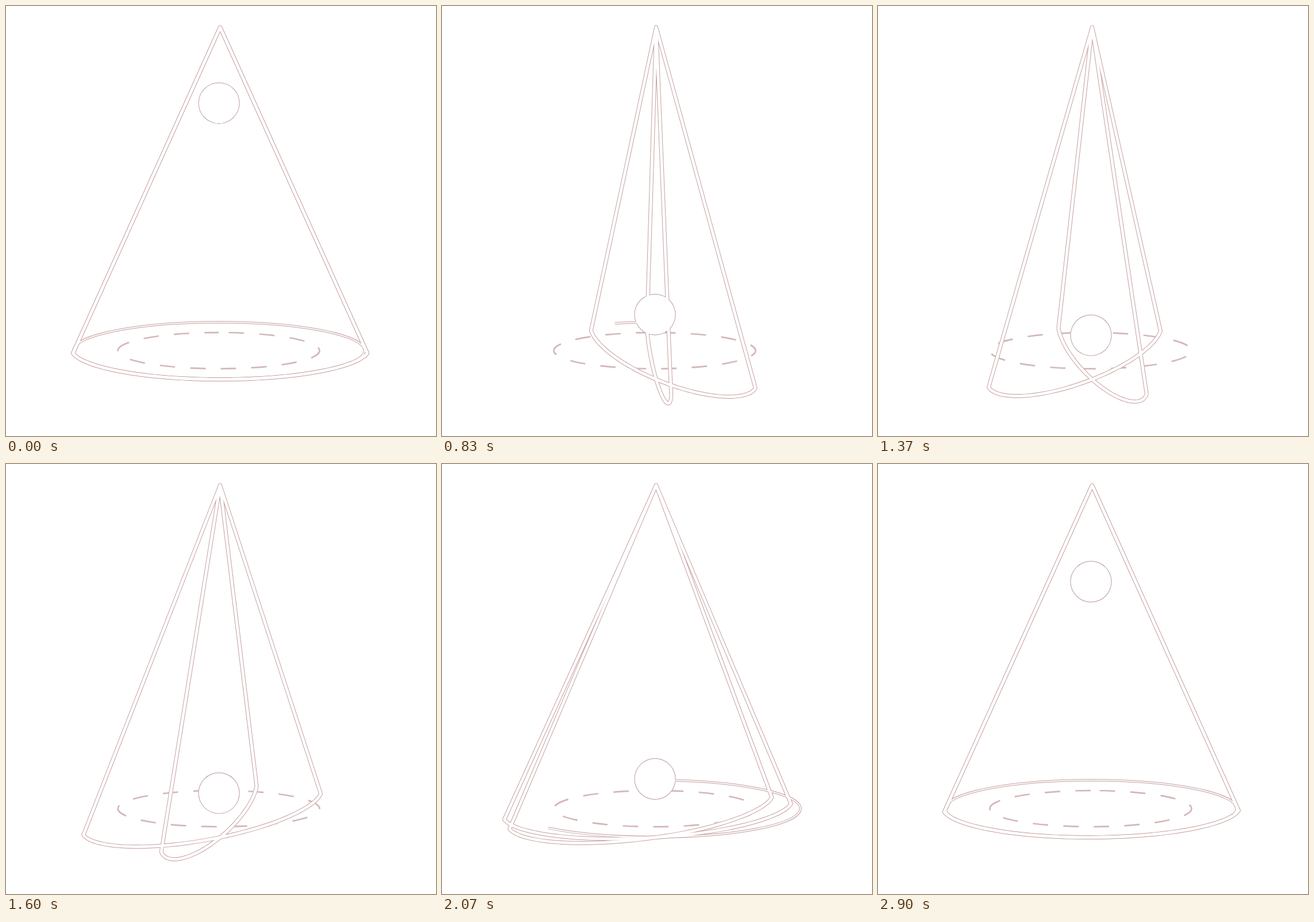
Animation, 748 px wide and 748 px high, one loop 2.93 s. Source, as an HTML page with a canvas:

```html
<!DOCTYPE html>
<html lang="en">
<head>
<meta charset="utf-8">
<title>Spinning cone and ball</title>
<style>
  html, body { margin: 0; width: 100%; height: 100%; overflow: hidden; background: #fff; }
  canvas { display: block; width: 748px; height: 748px; }
</style>
</head>
<body>
<canvas id="stage" width="748" height="748"></canvas>
<script>
const ctx = document.getElementById('stage').getContext('2d');
const LOOP = 2930, STEPS = 88, TURN = 1465;
const TAU = Math.PI * 2;
const EDGE = '#c39c9c', BALL_EDGE = '#b8989e';

const clamp = v => Math.min(1, Math.max(0, v));
const cubic = (a, b, c, d, s) => {
  const r = 1 - s;
  return r * r * r * a + 3 * r * r * s * b + 3 * r * s * s * c + s * s * s * d;
};

function bezier(x1, y1, x2, y2) {
  return x => {
    if (x <= 0 || x >= 1) return clamp(x);
    let lo = 0, hi = 1;
    for (let i = 0; i < 24; i++) {
      const mid = (lo + hi) / 2;
      if (cubic(0, x1, x2, 1, mid) < x) lo = mid; else hi = mid;
    }
    return cubic(0, y1, y2, 1, lo);
  };
}

const fall = bezier(.167, .55, .35, 1);
const rise = bezier(.65, 0, .833, .333);
const sweep = bezier(.167, .6, .26, 1);

// Smooth curve through [time, degrees] keys.
function track(keys) {
  const slope = i => {
    const a = keys[Math.max(0, i - 1)], b = keys[Math.min(keys.length - 1, i + 1)];
    return (b[1] - a[1]) / (b[0] - a[0]);
  };
  return t => {
    let i = 0;
    while (i < keys.length - 2 && t >= keys[i + 1][0]) i++;
    const [t0, v0] = keys[i], [t1, v1] = keys[i + 1], d = (t1 - t0) / 3;
    return cubic(v0, v0 + slope(i) * d, v1 - slope(i + 1) * d, v1, (t - t0) / (t1 - t0));
  };
}

const spins = [
  track([[0, 720], [470, 393.2], [830, 302.7], [1370, 235.5], [1800, 207],
         [2300, 185.8], [2900, 181], [2930, 180]]),
  track([[0, 720], [470, 393.2], [830, 275.3], [1085, 172], [1370, 105.6],
         [1800, 50], [2300, 15.5], [2900, 1], [2930, 0]])
];

// Flat sector outline: apex, then the curved hem from right to left.
const R = 256, DEPTH = 1039, sector = [[0, 37]];
for (let i = -24; i <= 24; i++) {
  const s = 1 - Math.abs(i) / 24;
  const x = R * cubic(1, .94, .55, 0, s);
  sector.push([i > 0 ? -x : x, cubic(604, 627, 649.5, 649.5, s)]);
}

function sheet(degrees, width) {
  const a = degrees * Math.PI / 180;
  ctx.beginPath();
  for (const [u, y] of sector) {
    const k = DEPTH / (DEPTH + u * Math.sin(a));
    ctx.lineTo(372.5 + u * Math.cos(a) * k, 374 + (y - 374) * k);
  }
  ctx.closePath();
  ctx.lineWidth = width;
  ctx.stroke();
}

function ring(cx, cy, rx, ry, width, dash, shift = 0) {
  ctx.beginPath();
  ctx.ellipse(cx, cy, rx, ry, 0, -TAU / 4, TAU * .75);
  ctx.setLineDash(dash);
  ctx.lineDashOffset = shift;
  ctx.lineWidth = width;
  ctx.stroke();
  ctx.setLineDash([]);
}

const RIM = 1062;

// One layer of all shapes; a padded coloured layer leaves an outline around the white one.
function layer(t, pad, color, ballColor) {
  ctx.strokeStyle = color;
  ctx.lineJoin = 'round';

  ring(370, 599.5, 175.5, 31.5, .5 + pad, [26.5, 26.5], -17.6 - 159 * t / LOOP);

  const from = t < TURN ? sweep(t / TURN) : 0;
  const to = t < TURN ? 1 : sweep((t - 1800) / 1060);
  if (to > from) ring(370.5, 599.5, 253, 49.5, 2.2 + pad, [0, from * RIM, (to - from) * RIM, RIM]);

  for (const spin of spins) sheet(spin(t), 4.9 + pad);

  const drop = t < TURN ? fall(t / TURN) : 1 - rise((t - TURN) / (LOOP - TURN));
  ctx.beginPath();
  ctx.arc(370.5, 169 + 404.5 * drop, 35.1 + pad / 2, 0, TAU);
  ctx.fillStyle = ballColor;
  ctx.fill();
}

function draw(t) {
  ctx.fillStyle = '#fff';
  ctx.fillRect(0, 0, 748, 748);
  layer(t, 1.9, EDGE, BALL_EDGE);
  layer(t, 0, '#fff', '#fff');
}

const start = performance.now();
function tick() {
  const t = (performance.now() - start) % LOOP;
  const step = Math.floor(t * STEPS / LOOP + .12) % STEPS;
  draw(step * LOOP / STEPS);
  requestAnimationFrame(tick);
}
tick();
</script>
</body>
</html>
```
